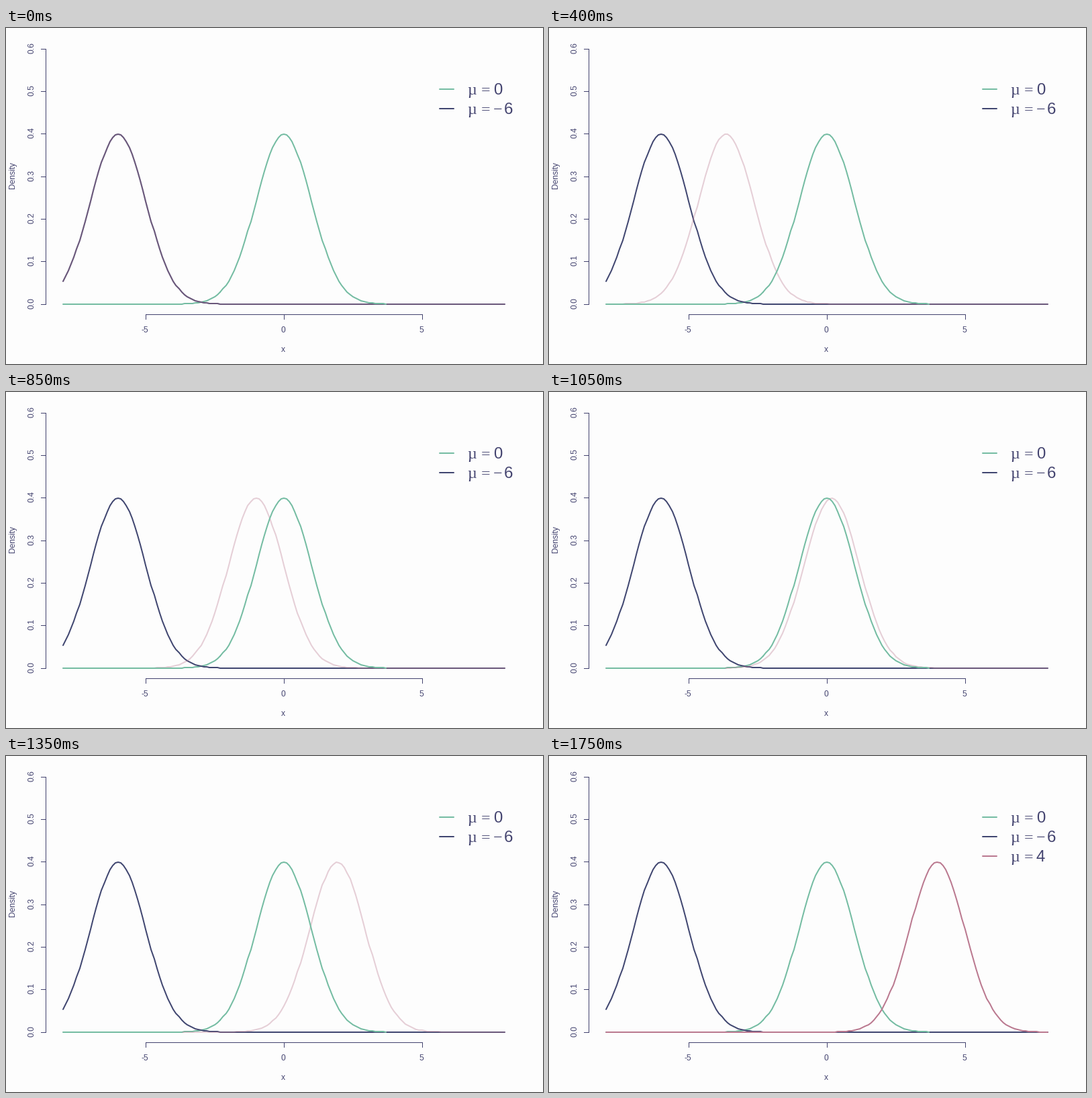
A matplotlib script that plays this animation: 800 by 500 pixels, repeating every 1800 ms.

```python
import numpy as np
import matplotlib.pyplot as plt
from matplotlib.animation import FuncAnimation

W, H, DPI = 800, 500, 100
PT = 72 / DPI  # points per pixel
FRAMES, INTERVAL = 36, 50
START, END = -6, 4

PAPER = "#fdfdfd"
INK = "#43436f"
GREEN = "#74bca2"
NAVY = "#404670"
ROSE = "#ba788f"

fig = plt.figure(figsize=(W / DPI, H / DPI), dpi=DPI, facecolor=PAPER)
ax = fig.add_axes([0, 0, 1, 1])
ax.set(xlim=(0, W), ylim=(H, 0))
ax.axis("off")

grid = np.linspace(-8, 8, 161)


def px(x):
    return np.floor(414.4 + 41.13 * x)


def py(y):
    return np.floor(411.3 - 633.5 * y)


def bell(mu):
    """Unit normal density as whole-pixel points."""
    dens = np.exp(-(grid - mu) ** 2 / 2) / np.sqrt(2 * np.pi)
    return px(grid), py(dens)


def stroke(x, y, color, width=2, cap="round", **kw):
    return ax.plot(x, y, color=color, lw=width * PT, solid_capstyle=cap,
                   solid_joinstyle="round", **kw)[0]


def rule(x0, y0, x1, y1):
    # Whole coordinates snap to the middle of the pixel
    stroke([x0, x1], [y0, y1], INK, 1, "projecting")


def label(x, y, s, size=12, font="Liberation Sans", ha="center", rot=0):
    return ax.text(x, y, s, size=size * PT, family=font, color=INK, ha=ha,
                   va="baseline", rotation=rot, rotation_mode="anchor")


def legend_row(row, color, value):
    y = 91 + 29 * row
    base = y + 8
    parts = [stroke([646, 667], [y, y], color)]
    glyphs = [(687.5, "\u00b5"), (707.5, "=")]
    x = 726
    if value < 0:
        glyphs.append((x, "\u2212"))
        x += 15.5
    parts += [label(gx, base, g, 24, "Liberation Serif", "left")
              for gx, g in glyphs]
    parts.append(label(x, base, str(abs(value)), 24, ha="left"))
    return parts


# Axes
rule(59, 31, 59, 411)
for v in np.arange(7) / 10:
    rule(52, py(v), 59, py(v))
    label(42, py(v) - 1, f"{v:.1f}", rot=90)
rule(208, 426, 620, 426)
for v in (-5, 0, 5):
    rule(px(v), 426, px(v), 433)
    label(px(v) - 1, 453, str(v))
label(413, 482, "x")
label(13, 219, "Density", rot=90)

# Fixed curves: green lies over the moving one, but under navy at their feet
gx, gy = bell(0)
foot = (grid > -3.75) & (grid < -2.25)
body = ((grid < -3.65) | (grid > -2.35)) & (grid < 3.75)
stroke(gx[foot], gy[foot], GREEN, zorder=3)
stroke(*bell(START), NAVY, zorder=4)
stroke(gx, np.where(body, gy, np.nan), GREEN, zorder=6)

legend_row(0, GREEN, 0)
legend_row(1, NAVY, START)
last_row = legend_row(2, ROSE, END)
mover = stroke(*bell(START), ROSE, alpha=0.35, zorder=5)


def update(i):
    steps = FRAMES - 2
    done = i > steps
    mover.set_data(*bell(START + (END - START) * min(i, steps) / steps))
    mover.set_alpha(1 if done else 0.35)
    mover.set_zorder(7 if done else 5)
    for part in last_row:
        part.set_visible(done)
    return [mover, *last_row]


anim = FuncAnimation(fig, update, frames=FRAMES, interval=INTERVAL,
                     init_func=lambda: update(0), repeat=True, repeat_delay=0)
plt.show()
```
